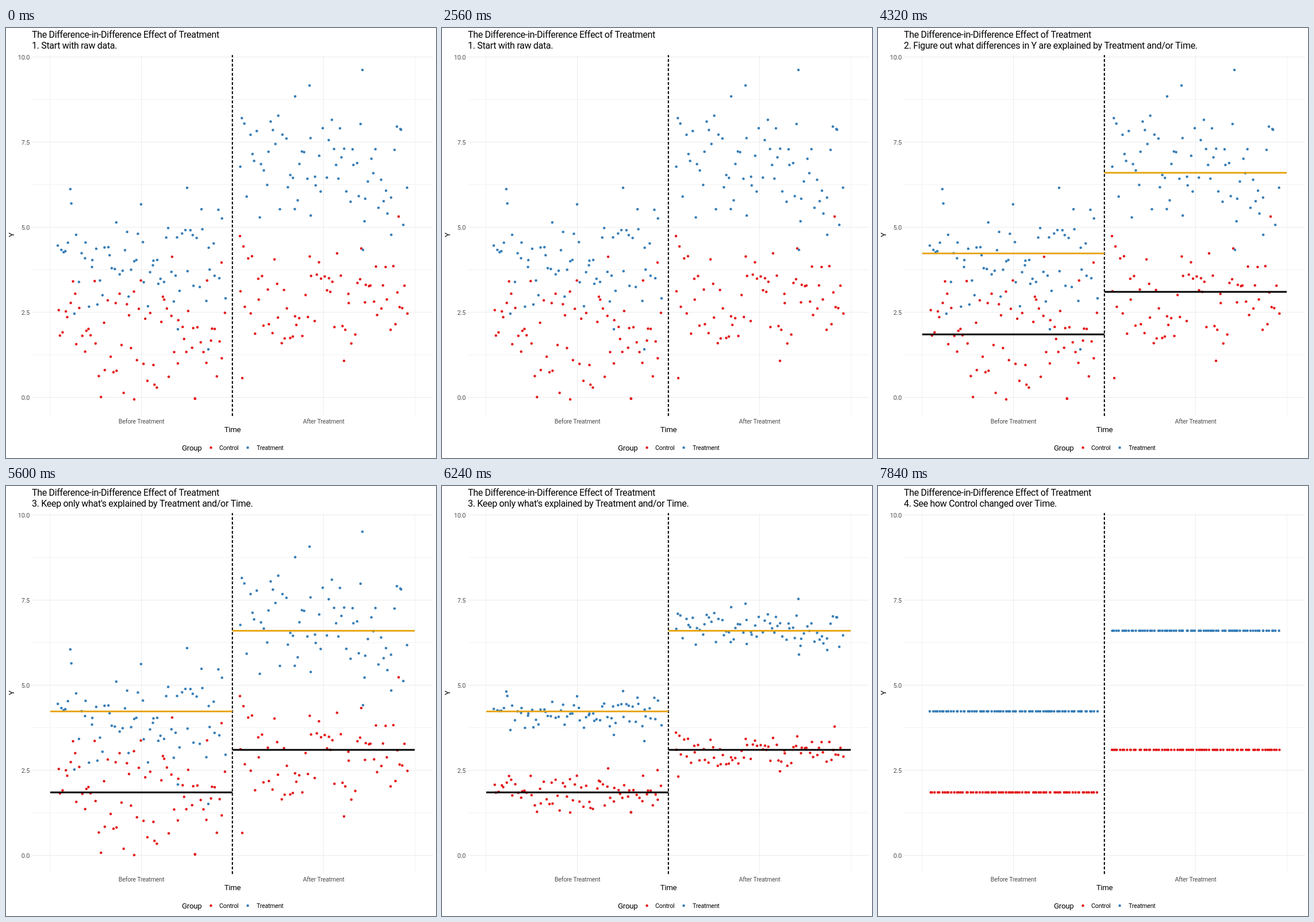
An HTML page with a canvas for the animation above (8 s loop, 748 by 748 pixels).

```html
<!DOCTYPE html>
<html lang="en">
<head>
<meta charset="utf-8">
<title>Difference-in-Difference</title>
<style>
  html, body { margin: 0; width: 100%; height: 100%; overflow: hidden; background: #fff; }
  canvas { display: block; width: 748px; height: 748px; }
</style>
</head>
<body>
<canvas id="stage"></canvas>
<script>
const SIZE = 748, LOOP = 8000, STEP = 160;
const RED = '#e41a1c', BLUE = '#377eb8', ORANGE = '#e69f00';
const GREY = '#4d4d4d', MAJOR = '#ebebeb', MINOR = '#f2f2f2';

const canvas = document.getElementById('stage');
const ctx = canvas.getContext('2d');
const ratio = window.devicePixelRatio || 1;
canvas.width = canvas.height = SIZE * ratio;
ctx.scale(ratio, ratio);

const POINTS = 75;
const HALF = 317, LEFT = 77, MIDDLE = LEFT + HALF;
const BASE = 1.85, TREATED = 2.38, LATER = 1.25, EFFECT = 1.12;

const captions = [
  [0, '1. Start with raw data.'],
  [3040, '2. Figure out what differences in Y are explained by Treatment and/or Time.'],
  [5240, "3. Keep only what's explained by Treatment and/or Time."],
  [7520, '4. See how Control changed over Time.']
];
const LINES_ON = 3680, LINES_OFF = 6986;
const COLLAPSE = 5236, COLLAPSE_LENGTH = 1750;

const toY = value => 642.5 - 59.2 * value;

function seeded(seed) {
  return () => {
    seed = (seed + 0x6d2b79f5) | 0;
    let t = Math.imul(seed ^ (seed >>> 15), 1 | seed);
    t = (t + Math.imul(t ^ (t >>> 7), 61 | t)) ^ t;
    return ((t ^ (t >>> 14)) >>> 0) / 4294967296;
  };
}
const random = seeded(17);

// Normal deviate, cut off so that only the outliers lie far out
function deviate() {
  let z;
  do {
    z = Math.sqrt(-2 * Math.log(1 - random())) * Math.cos(2 * Math.PI * random());
  } while (Math.abs(z) > 1.7);
  return z;
}

function makeGroup(treated, after, spread, outliers) {
  const mean = toY(BASE + treated * TREATED + after * LATER + treated * after * EFFECT);
  const left = after ? MIDDLE : LEFT;
  const points = outliers.slice();
  const count = POINTS - points.length;
  for (let i = 0; i < count; i++) {
    const x = left + 12 + (HALF - 24) * (i + random()) / count;
    points.push([x, mean + spread * deviate()]);
  }
  return { mean, left, points, color: treated ? BLUE : RED, line: treated ? ORANGE : '#000' };
}

const groups = [
  makeGroup(0, 0, 66, [[223, 646], [329, 645], [289, 398], [375, 408]]),
  makeGroup(1, 0, 66, [[352, 559], [299, 524], [315, 278]]),
  makeGroup(0, 1, 54, [[683, 328], [411, 609], [588, 579], [407, 362]]),
  makeGroup(1, 1, 64, [[620, 73], [528, 100], [503, 119], [621, 386]])
];

function cubicInOut(t) {
  t = Math.min(1, Math.max(0, t));
  return t < 0.5 ? 4 * t ** 3 : 1 - 4 * (1 - t) ** 3;
}

function line(x1, y1, x2, y2, color, width) {
  ctx.strokeStyle = color;
  ctx.lineWidth = width;
  ctx.beginPath();
  ctx.moveTo(x1, y1);
  ctx.lineTo(x2, y2);
  ctx.stroke();
}

function dot(x, y, color) {
  ctx.fillStyle = color;
  ctx.beginPath();
  ctx.arc(x, y, 2.25, 0, Math.PI * 2);
  ctx.fill();
}

function text(str, x, y, size, color = '#000', align = 'left') {
  ctx.font = `${size}px Roboto, "Open Sans", sans-serif`;
  ctx.letterSpacing = `${-0.02 * size}px`;
  ctx.textAlign = align;
  ctx.fillStyle = color;
  ctx.fillText(str, x, y);
}

function drawGrid() {
  for (let value = 0; value <= 10; value += 1.25) {
    const y = toY(value);
    const major = value % 2.5 === 0;
    line(45, y, 743, y, major ? MAJOR : MINOR, 1);
    if (major) text(value.toFixed(1), 41, y + 4, 10.8, GREY, 'right');
  }
  for (const x of [76.5, 711.5]) line(x, 47, x, 674, MINOR, 1);
  for (const x of [235.5, 552.5]) line(x, 47, x, 674, MAJOR, 1);
}

function drawLabels(caption) {
  text('The Difference-in-Difference Effect of Treatment', 45, 17, 16.05);
  text(caption, 45, 36, 16.05);
  text('Before Treatment', 235.5, 688, 10.7, GREY, 'center');
  text('After Treatment', 552.5, 688, 10.7, GREY, 'center');
  text('Time', 394, 703, 13.2, '#000', 'center');
  ctx.save();
  ctx.translate(14, 360);
  ctx.rotate(-Math.PI / 2);
  text('Y', 0, 0, 13.2, '#000', 'center');
  ctx.restore();
  text('Group', 306, 735, 13.3);
  dot(356.5, 730, RED);
  text('Control', 371, 734, 10.8);
  dot(420.5, 730, BLUE);
  text('Treatment', 436, 734, 10.6);
}

function draw(time) {
  ctx.fillStyle = '#fff';
  ctx.fillRect(0, 0, SIZE, SIZE);
  drawGrid();
  drawLabels(captions.filter(([start]) => start <= time).pop()[1]);

  ctx.setLineDash([5, 3]);
  line(393.8, 675, 393.8, 47, '#000', 2);
  ctx.setLineDash([]);

  const pull = cubicInOut((time - COLLAPSE) / COLLAPSE_LENGTH);
  for (const { mean, color, points } of groups) {
    for (const [x, y] of points) dot(x, y + (mean - y) * pull, color);
  }
  if (time >= LINES_ON && time < LINES_OFF) {
    for (const g of groups) line(g.left, g.mean, g.left + HALF, g.mean, g.line, 2.8);
  }
}

const begin = performance.now();
function tick() {
  const elapsed = Math.max(0, performance.now() - begin) % LOOP;
  draw(Math.floor(elapsed / STEP) * STEP);
  requestAnimationFrame(tick);
}
tick();
</script>
</body>
</html>
```
